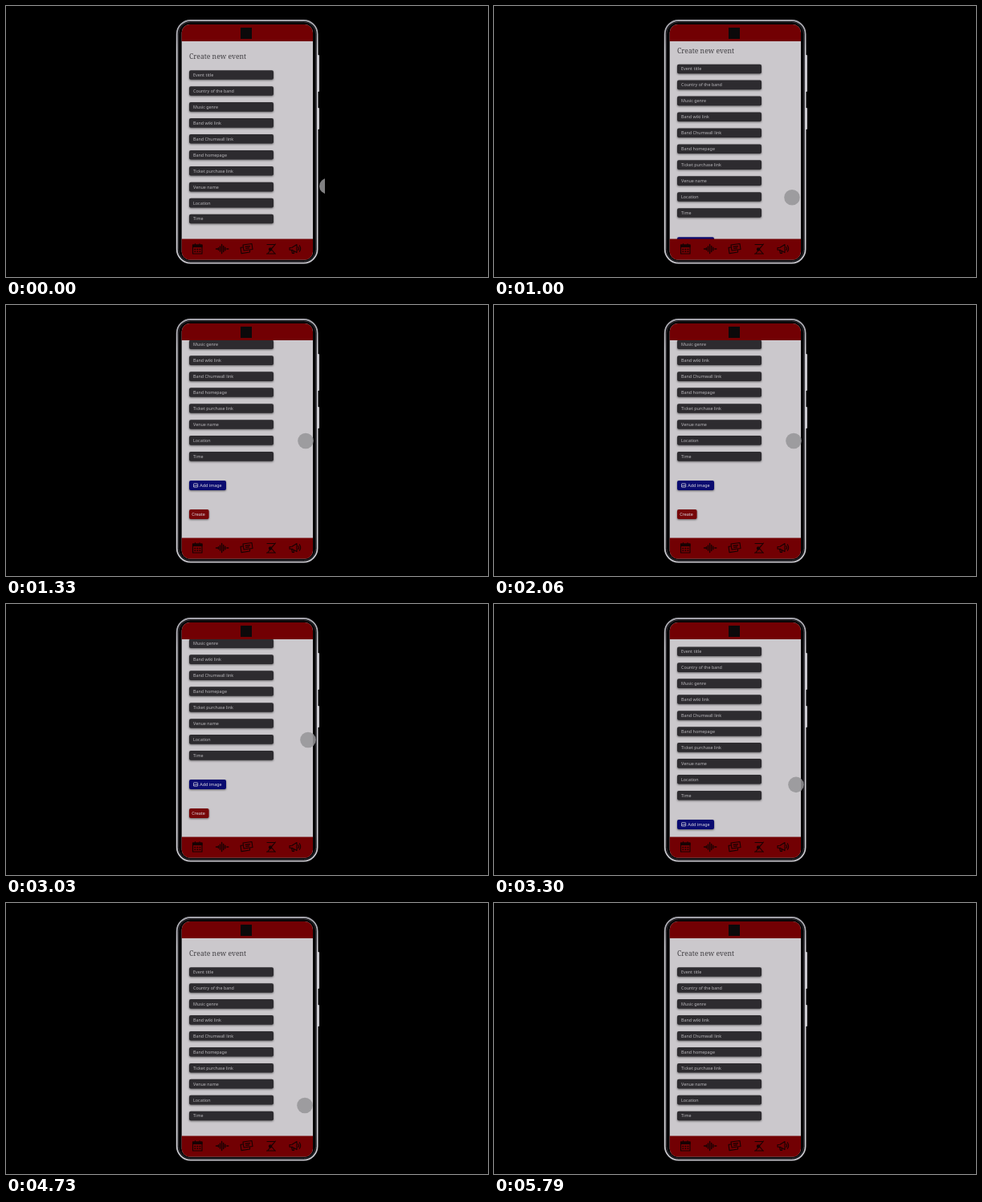
An HTML page that plays this animation: 600 by 338 pixels, repeating every 5.85 s.

```html
<!DOCTYPE html>
<html lang="en">
<head>
<meta charset="utf-8">
<title>Create new event</title>
<style>
html, body { margin: 0; width: 100%; height: 100%; overflow: hidden; background: #000; }
svg { display: block; width: 100vw; height: 100vh; }
text { font: 5.4px "Noto Sans", sans-serif; fill: #b9b7bb; }
.title { font: 8.6px "Noto Serif", serif; fill: #434145; }
.raised { filter: drop-shadow(0 1px .8px rgba(0, 0, 0, .5)); }
.light text { fill: #dcdae0; }
.icons { fill: none; stroke: #170203; stroke-width: 1.1; stroke-linecap: round; stroke-linejoin: round; }
.icons .solid { fill: #170203; }

#page { animation: scroll 5850ms linear infinite; }
#touch {
  fill: #969598;
  animation: touch-x 5850ms linear infinite, touch-y 5850ms linear infinite, lift 5850ms linear infinite;
}

@keyframes scroll {
  0% { transform: translateY(0); }
  16.496% { transform: translateY(0); animation-timing-function: cubic-bezier(.25, .2, .65, 1); }
  22.735% { transform: translateY(-76.7px); }
  52.308% { transform: translateY(-76.7px); animation-timing-function: cubic-bezier(.333, .667, .667, 1); }
  62.393%, 100% { transform: translateY(0); }
}
@keyframes touch-x {
  0% { cx: 400px; animation-timing-function: ease-out; }
  4.103%, 8.547% { cx: 378px; }
  9.915%, 15.043% { cx: 372px; }
  17.094% { cx: 371px; }
  22.735%, 44.103% { cx: 373px; }
  49.573%, 56.41% { cx: 376px; }
  61.538%, 100% { cx: 372px; }
}
@keyframes touch-y {
  0% { cy: 224.5px; animation-timing-function: ease-out; }
  4.103%, 8.547% { cy: 248px; }
  9.915% { cy: 252.5px; }
  15.043% { cy: 252.5px; animation-timing-function: cubic-bezier(.37, 0, .63, 1); }
  22.735% { cy: 169.5px; }
  51.966% { cy: 169.5px; animation-timing-function: cubic-bezier(.333, .667, .667, 1); }
  62.393%, 100% { cy: 252.5px; }
}
@keyframes lift {
  0%, 90.598% { opacity: .86; }
  94.017%, 100% { opacity: 0; }
}
</style>
</head>
<body>
<svg viewBox="0 0 600 338">
  <defs>
    <linearGradient id="metal" x1="0" y1="0" x2="0" y2="1">
      <stop offset="0" stop-color="#a3a2aa"/>
      <stop offset=".12" stop-color="#cfced4"/>
      <stop offset=".88" stop-color="#d6d5da"/>
      <stop offset="1" stop-color="#c4c3c9"/>
    </linearGradient>
    <clipPath id="screen"><rect x="218.7" y="23" width="163.3" height="293.5" rx="10"/></clipPath>
    <clipPath id="body"><rect x="218" y="44" width="165" height="246.5"/></clipPath>
    <clipPath id="capture"><rect width="397" height="338"/></clipPath>
  </defs>
  <rect width="600" height="338"/>

  <!-- phone -->
  <g fill="#c3c2c8">
    <rect x="387" y="61" width="3" height="46" rx="1"/>
    <rect x="387" y="127" width="3" height="27" rx="1"/>
  </g>
  <rect x="212.7" y="18" width="174.9" height="302.6" rx="17" fill="#050506" stroke="url(#metal)" stroke-width="1.8"/>
  <rect x="214.6" y="19.9" width="171.1" height="298.8" rx="15.2" fill="none" stroke="#35343b"/>

  <g clip-path="url(#screen)">
    <rect x="218" y="23" width="165" height="294" fill="#cbc8cc"/>
    <g clip-path="url(#body)">
      <g id="page">
        <text class="title" x="228" y="66.3">Create new event</text>
        <g class="raised" id="fields"></g>
        <g class="raised light">
          <rect x="228" y="295.7" width="46" height="12" rx="2" fill="#0a0b70"/>
          <g fill="none" stroke="#dcdae0" stroke-width=".7">
            <rect x="233.5" y="299.5" width="5.2" height="4.4" rx=".6"/>
            <path d="M233.6 303.4l1.7-1.8 1 1 1-1.3 1.4 1.8"/>
          </g>
          <text x="241.3" y="303.7">Add image</text>
          <rect x="228" y="331.8" width="24.6" height="12" rx="2" fill="#760709"/>
          <text x="231.2" y="339.8">Create</text>
        </g>
      </g>
    </g>

    <rect x="218" y="23" width="165" height="21" fill="#720003"/>
    <rect x="292" y="27" width="14" height="14" fill="#0b090a"/>

    <rect x="218" y="290.5" width="165" height="27" fill="#720003"/>
    <g class="icons">
      <path d="M232.5 298h11.5v11h-11.5zM235.5 296.5v1M241 296.5v1"/>
      <path class="solid" d="M232.5 298h11.5v2.5h-11.5z"/>
      <path d="M235 303.5h7M235 306.3h7" stroke-width="1.5" stroke-dasharray=".5 2.6"/>
      <path d="M261.5 303h2M264.5 301.8v2.4M266.5 300v6M268.6 297.5v11M270.7 299.5v7M272.8 301.3v3.4M274.8 303h2" stroke-width="1.4"/>
      <path d="M295 298l11-1.5 1 7-11 1.5zM294.5 301l-2.5.4 1 7.2 10.5-1.6v-2M298 300.4l5.5-.8M298.5 302.5l4-.6"/>
      <path d="M325 297.5h10l-9 11M335.5 297l-5.5 6 4.5 5.5M324.5 309h11"/>
      <circle class="solid" cx="329" cy="303.5" r="1.6"/>
      <path d="M353 301.5l3-.3 6-3.7v10l-6-3.2-3-.2zM355.5 304.5l1 4h2l-.8-3.3M363.8 300.5q1.4 2 0 4M365.3 298.7q2.6 3.8 0 7.6"/>
    </g>
  </g>

  <g clip-path="url(#capture)"><circle id="touch" cx="400" cy="224.5" r="9.8"/></g>
</svg>
<script>
const labels = ["Event title", "Country of the band", "Music genre", "Band wiki link", "Band Chumwall link",
  "Band homepage", "Ticket purchase link", "Venue name", "Location", "Time"];
document.getElementById("fields").innerHTML = labels.map((label, i) => {
  const y = 86 + i * 19.95;
  return `<rect x="228" y="${y - 5.8}" width="105" height="11.6" rx="2" fill="#2d2b2f"/>
    <text x="233" y="${y + 1.9}">${label}</text>`;
}).join("");
</script>
</body>
</html>
```
